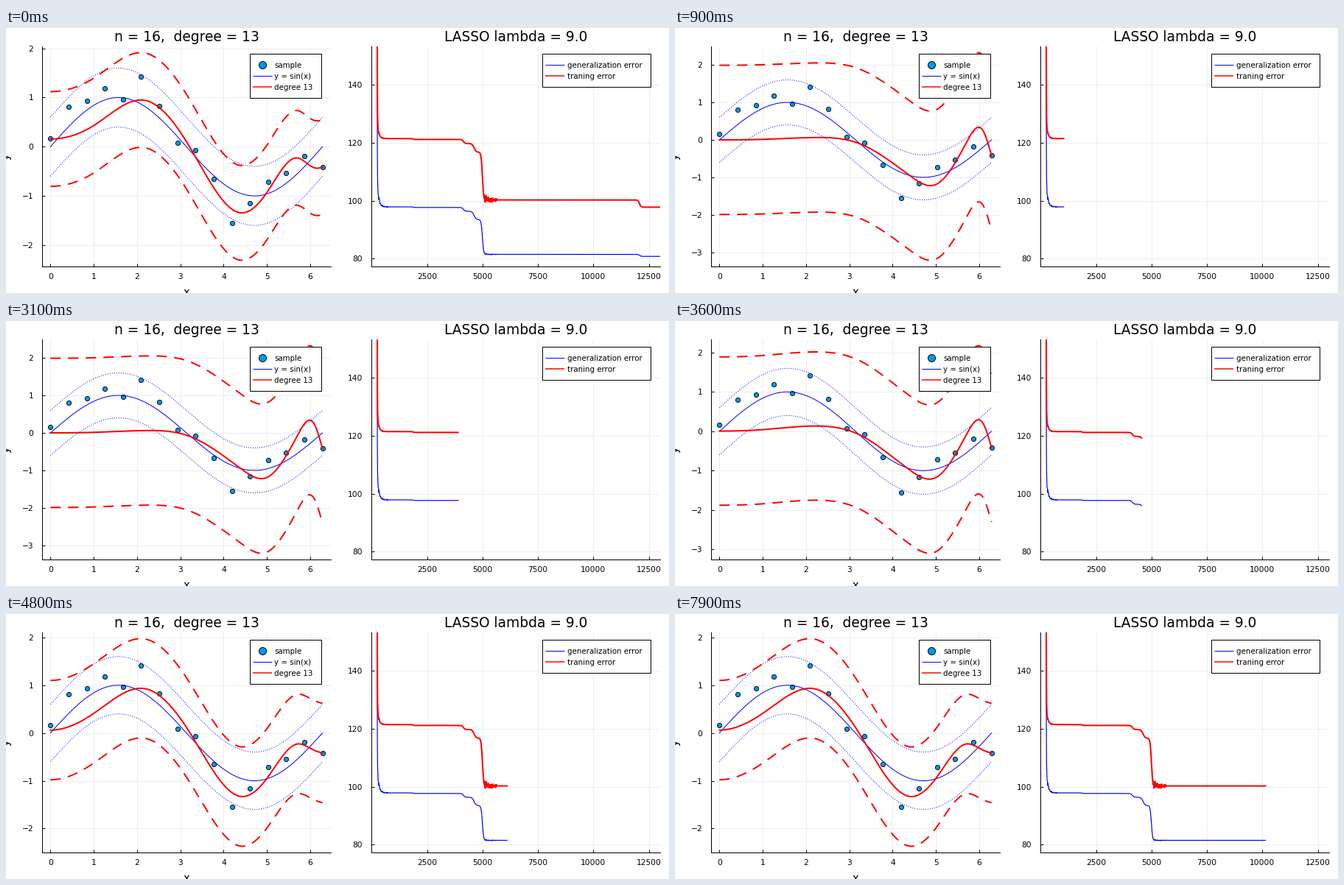
Animation, 900 px wide and 360 px high, one loop 8 s. Source, as a matplotlib script:

```python
import numpy as np
import matplotlib.pyplot as plt
from matplotlib.animation import FuncAnimation
from matplotlib.patches import Rectangle

W, H, DPI = 900, 360, 96
PX = 72 / DPI                       # one pixel in points
TOP, BOTTOM = 25, 324
FRAMES, STEP, RUNS = 80, 130, 101
RED, BLUE, DOT = "#ff0000", "#0000ff", "#009afa"

plt.rcParams.update({"font.family": "DejaVu Sans", "font.size": 8})


def spline(xs, ys, x):
    """Cubic spline, flat at the left end and free at the right one."""
    xs, ys = np.array(xs), np.array(ys)
    n, h = len(xs), np.diff(xs)
    d = np.diff(ys) / h
    a, r = np.eye(n), np.zeros(n)
    a[0, :2], r[0] = (2 * h[0], h[0]), 6 * d[0]
    for i in range(1, n - 1):
        a[i, i - 1:i + 2] = h[i - 1], 2 * (h[i - 1] + h[i]), h[i]
        r[i] = 6 * (d[i] - d[i - 1])
    m = np.linalg.solve(a, r)
    k = np.clip(np.searchsorted(xs, x) - 1, 0, n - 2)
    t = x - xs[k]
    slope = d[k] - h[k] * (2 * m[k] + m[k + 1]) / 6
    return ys[k] + t * slope + t**2 * m[k] / 2 + t**3 * (m[k + 1] - m[k]) / (6 * h[k])


def rise(t, centre, width):
    """Smooth step from 0 to 1."""
    return .5 + .5 * np.tanh((t - centre) / (2 * width))


# Samples, and the four stages the fit passes through
END = 2 * np.pi
x = np.linspace(0, END, 400)
xs = np.linspace(0, END, 16)
ys = np.array([.165, .81, .93, 1.185, .965, 1.42, .825, .08,
               -.07, -.66, -1.55, -1.155, -.72, -.54, -.185, -.42])
knots = [0, 1, 2.2, 3.2, 4.4, 5, 5.7, 6.1, END]
stages = [spline(knots, p, x) for p in (
    [0, .014, .062, -.085, -.955, -1.19, -.08, .22, -.42],
    [.056, .28, .757, .06, -1.255, -1.04, -.2, -.155, -.4],
    [.06, .41, .925, .035, -1.33, -.95, -.23, -.365, -.42],
    [.157, .43, .94, .02, -1.345, -.93, -.227, -.43, -.42])]
bands = [1.99, .967, 1.04, .963]


def fit(it):
    """Fitted curve and half width of its band after `it` iterations."""
    s = (.08 * rise(it, 4140, 35) + .12 * rise(it, 4620, 50)
         + 1.8 * rise(it, 5075, 50) + rise(it, 12080, 45))
    k = min(int(s), 2)
    curve = stages[k] + (s - k) * (stages[k + 1] - stages[k])
    burst = 30 * np.exp(-it / 60)
    return curve + burst * (x / END)**12, np.interp(s, range(4), bands) + .4 * burst


# Error histories: a steep start, then a few smooth drops
its = np.arange(0, 13001, 10)
rng = np.random.default_rng(4)
noise = np.clip(rng.normal(size=its.size), -1.6, 1.6)
early = (its > 250) * np.exp((250 - its) / 150)
late = ((its > 5070) & (its < 5650)) * np.exp((5070 - its) / 400)


def history(start, tail, drops, shake):
    err = start + tail * np.exp((250 - its) / 70) + 40 * np.exp((250 - its) / 8)
    for drop, centre, width in zip(drops, (1870, 4140, 4620, 4995, 12080),
                                   (20, 35, 45, 28, 35)):
        err -= drop * rise(its, centre, width)
    return np.minimum(err + noise * (shake[0] * early + shake[1] * late), 900)


train = history(121.5, 5.8, (.3, 1.4, 3, 16.5, 2.5), (.3, 1.1))
general = history(97.9, 9, (.2, 1.3, 2.9, 12, .7), (.8, .15))

# Layout in pixels
fig = plt.figure(figsize=(W / DPI, H / DPI), dpi=DPI, facecolor="white")


def box(left, right):
    return [left / W, 1 - BOTTOM / H, (right - left) / W, (BOTTOM - TOP) / H]


def panel(left, right):
    ax = fig.add_axes(box(left, right))
    ax.spines[["top", "right"]].set_visible(False)
    ax.spines[["left", "bottom"]].set_linewidth(PX)
    ax.grid(color="#eeeeee", lw=PX)
    ax.set_axisbelow(True)
    ax.tick_params(direction="in", length=3, width=PX)
    ax.tick_params(axis="x", pad=7)
    ax.tick_params(axis="y", pad=9)
    return ax


L0, L1, R0, R1 = 49.2, 440.7, 496.3, 887.6
left, right = panel(L0, L1), panel(R0, R1)
pad = .03 * END
left.set(xlim=(-pad, END + pad), xticks=range(7))
right.set(xlim=(0, 13000), ylim=(77.3, 153.35),
          xticks=range(2500, 12501, 2500), yticks=range(80, 141, 20))

left.plot(xs, ys, "o", color=DOT, ms=6.2 * PX, mec="black", mew=.9 * PX, zorder=2)
left.plot(x, np.sin(x), color=BLUE, lw=PX, zorder=3)
for off in (-.6, .6):
    left.plot(x, np.sin(x) + off, color=BLUE, lw=PX, ls=(0, (1, 2)), zorder=3)
mid, = left.plot([], [], color=RED, lw=2 * PX, zorder=4)
low, high = (left.plot([], [], color=RED, lw=2 * PX, ls=(0, (7, 5)), zorder=4)[0]
             for _ in range(2))
gen_line, = right.plot([], [], color=BLUE, lw=1.2 * PX, zorder=3)
train_line, = right.plot([], [], color=RED, lw=2 * PX, zorder=4)

# Titles, labels and legends on a pixel canvas
top = fig.add_axes([0, 0, 1, 1], zorder=5)
top.set(xlim=(0, W), ylim=(H, 0))
top.axis("off")


def label(px, py, text, size, ha="center", va="baseline", **kw):
    return top.text(px, py, text, fontsize=size, ha=ha, va=va, **kw)


title = label((L0 + L1) / 2, 18, "n = 16,  degree = 13", 14)
label((R0 + R1) / 2, 18, "LASSO lambda = 9.0", 14)
xlabel = label((L0 + L1) / 2, 364.5, "x", 11)
label(5, 174.5, "y", 11, rotation=90, rotation_mode="anchor")


def legend(x0, x1, entries):
    height = 15 * len(entries) + 15
    top.add_patch(Rectangle((x0, 34.5), x1 - x0, height, fc="white", ec="black", lw=PX))
    for i, (text, color, lw) in enumerate(entries):
        y = 50 + 15 * i
        if lw:
            top.plot([x0 + 4.5, x0 + 30.5], [y, y], color=color, lw=lw * PX,
                     solid_capstyle="butt")
        else:
            top.plot([x0 + 17.5], [y], "o", color=color, ms=10 * PX, mec="black", mew=PX)
        label(x0 + 34, y + 4, text, 7.7, ha="left")


legend(330.5, 428, [("sample", DOT, 0), ("y = sin(x)", BLUE, 1), ("degree 13", RED, 1.5)])
legend(727.5, 874.5, [("generalization error", BLUE, 1), ("traning error", RED, 1.5)])


def scale_left(lo, hi):
    """Fit the y axis to the data; wide tick labels push the panel right."""
    m = .03 * (hi - lo)
    lo, hi = lo - m, hi + m
    step = next(s for s in (.5, 1, 2, 5, 10, 20, 50) if (hi - lo) / s <= 7)
    ticks = np.arange(np.ceil(lo / step), np.floor(hi / step) + 1) * step
    names = [f"{t:.{int(step < 1)}f}".replace("-", "\u2212") for t in ticks]
    left.set_ylim(lo, hi)
    left.set_yticks(ticks, names)
    x0 = L0 + 6.8 * max(0, max(map(len, names)) - 2)
    left.set_position(box(x0, L1))
    title.set_x((x0 + L1) / 2)
    xlabel.set_x((x0 + L1) / 2)


def draw(i):
    it = (i - 1) % RUNS * STEP
    curve, band = fit(it)
    mid.set_data(x, curve)
    low.set_data(x, curve - band)
    high.set_data(x, curve + band)
    scale_left(min(-1.6, (curve - band).min()), max(1.6, (curve + band).max()))
    n = it // 10 + 1
    gen_line.set_data(its[:n], general[:n])
    train_line.set_data(its[:n], train[:n])
    return mid, low, high, gen_line, train_line


anim = FuncAnimation(fig, draw, frames=FRAMES, interval=100, repeat=True)
plt.show()
```
